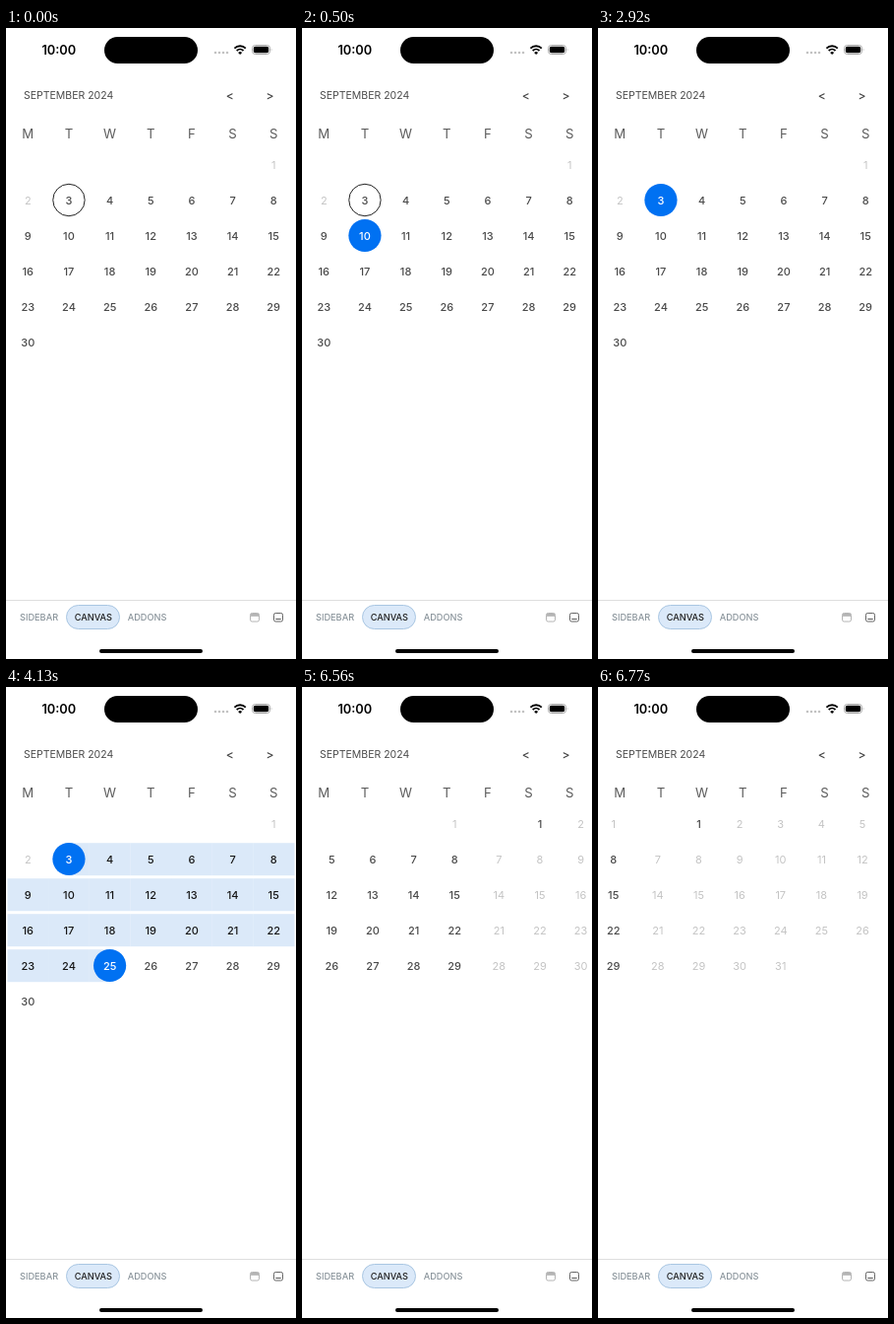
An HTML page that plays this animation: 295x640 px, repeating every 8 s.

```html
<!DOCTYPE html>
<html lang="en">
<head>
<meta charset="utf-8">
<title>Calendar range</title>
<style>
  html, body { margin: 0; width: 100%; height: 100%; overflow: hidden; background: #fff; }
  svg { display: block; width: 100%; height: 100%; font-family: Inter, Roboto, sans-serif; }
  .mid { text-anchor: middle; }
  .tab { font-size: 9.2px; font-weight: 500; fill: #8b959c; }
  .week { font-size: 13.2px; fill: #5c5c5c; }
  .day { font-size: 11px; font-weight: 500; fill: #4a4a4a; }
  .off { font-weight: 400; fill: #c4c4c4; }
  .in { fill: #161616; }
  .end { fill: #fff; }
</style>
</head>
<body>
<svg viewBox="0 0 295 640">
  <rect width="295" height="640" fill="#fff"/>

  <text x="53.8" y="26.6" class="mid" font-size="12.8" font-weight="600">10:00</text>
  <rect x="100" y="9" width="95" height="27" rx="13.5"/>
  <g fill="#c2c2c2">
    <circle cx="213" cy="25" r="1.3"/><circle cx="217" cy="25" r="1.3"/>
    <circle cx="221" cy="25" r="1.3"/><circle cx="225" cy="25" r="1.3"/>
  </g>
  <g fill="none" stroke="#000" stroke-width="1.9">
    <path d="M232.4 20.6a8.1 8.1 0 0 1 11.4 0"/>
    <path d="M234.7 23a4.9 4.9 0 0 1 6.8 0"/>
  </g>
  <path d="M238.1 27l-2-2.1a2.9 2.9 0 0 1 4 0z"/>
  <rect x="250.5" y="17.5" width="18" height="9" rx="3" fill="none" stroke="#a8a8a8"/>
  <rect x="251.8" y="18.8" width="15.4" height="6.4" rx="1.8"/>
  <path d="M269.8 20.5q1.4 1.5 0 3z" fill="#a8a8a8"/>

  <text x="18" y="72" font-size="10.5" fill="#4a4a4a">SEPTEMBER 2024</text>
  <g class="mid" font-size="12" font-weight="500" fill="#444">
    <text x="227.8" y="73.2">&lt;</text><text x="268.5" y="73.2">&gt;</text>
  </g>

  <g id="week"></g>
  <g id="pages"></g>

  <path d="M0 580.5H295" stroke="#dedede"/>
  <rect x="61.5" y="585.5" width="54" height="24" rx="12" fill="#dbe9f9" stroke="#a9c6e2"/>
  <g class="tab">
    <text x="14" y="601.3">SIDEBAR</text>
    <text x="69.7" y="601.3" fill="#222" style="fill:#222">CANVAS</text>
    <text x="123.7" y="601.3">ADDONS</text>
  </g>
  <g fill="none" stroke="#b4b4b4">
    <rect x="248.5" y="593.5" width="9" height="8.5" rx="1.8"/>
    <path d="M249 595.4h8" stroke-width="2.8"/>
  </g>
  <g fill="none" stroke="#666">
    <rect x="272.5" y="593.5" width="9" height="8.5" rx="1.8"/>
    <path d="M274.3 599.5h5.4" stroke-width="1.2"/>
  </g>
  <rect x="95" y="630" width="105" height="4" rx="2"/>
</svg>
<script>
const LOOP = 8000, WIDTH = 295, BLUE = '#0071f2', TINT = '#dbe9f9';
const TODAY = 3, LAST_OPEN = 31; // days counted from 1 September

// [time, first selected day, last selected day]
const PICKS = [
  [0, 0, 0], [500, 10, 10], [1600, 10, 24],
  [2920, 3, 3], [4130, 3, 25], [5540, 3, 3]
];
// [time, page offset]: the swipe moves in hard steps and stops part way
const SWIPE = [[0, 0], [6440, 33], [6550, 117], [6660, 200], [6770, 256.5]];

const $ = id => document.getElementById(id);
const colX = c => 22.3 + 41.65 * c;
const rowY = r => 138.5 + 36 * r;
const at = (steps, t) => steps.filter(s => s[0] <= t).pop();
const text = (x, y, cls, s) => `<text x="${x}" y="${y}" class="mid ${cls}">${s}</text>`;
const dot = (x, y, style) => `<circle cx="${x}" cy="${y}" ${style}/>`;

// Week rows start on Monday; first is the column of day 1
function month(first, count, base, from, to) {
  let bars = '', marks = '', labels = '';
  for (let d = 1; d <= count; d++) {
    const n = base + d, slot = first + d - 1, col = slot % 7;
    const x = colX(col), y = rowY(Math.floor(slot / 7));
    const inside = n >= from && n <= to, end = inside && (n === from || n === to);
    if (inside && from < to) {
      const left = n === from ? x : col === 0 ? 1.5 : x - 20.9;
      const right = n === to ? x : col === 6 ? 293.5 : x + 20.9;
      bars += `<rect x="${left}" y="${y - 16.5 + .2}" width="${right - left}" height="33" fill="${TINT}"/>`;
    }
    if (end) marks += dot(x, y, `r="16.6" fill="${BLUE}"`);
    else if (n === TODAY) marks += dot(x, y, 'r="16.2" fill="none" stroke="#222"');
    const open = n >= TODAY && n <= LAST_OPEN;
    labels += text(x, y + 4, 'day ' + (end ? 'end' : inside ? 'in' : open ? '' : 'off'), d);
  }
  return bars + marks + labels;
}

$('week').innerHTML = [...'MTWTFSS'].map((s, c) => text(colX(c), 111.8, 'week', s)).join('');

let shown = '';
function draw(t) {
  const [, from, to] = at(PICKS, t), shift = at(SWIPE, t)[1];
  const key = [from, to, shift].join();
  if (key === shown) return;
  shown = key;
  $('pages').innerHTML =
    `<g transform="translate(${-shift})">${month(6, 30, 0, from, to)}</g>` +
    `<g transform="translate(${WIDTH - shift})">${month(1, 31, 30, from, to)}</g>`;
}

const start = performance.now();
function tick(now) {
  draw(Math.max(0, now - start) % LOOP);
  requestAnimationFrame(tick);
}
draw(0);
requestAnimationFrame(tick);
</script>
</body>
</html>
```
